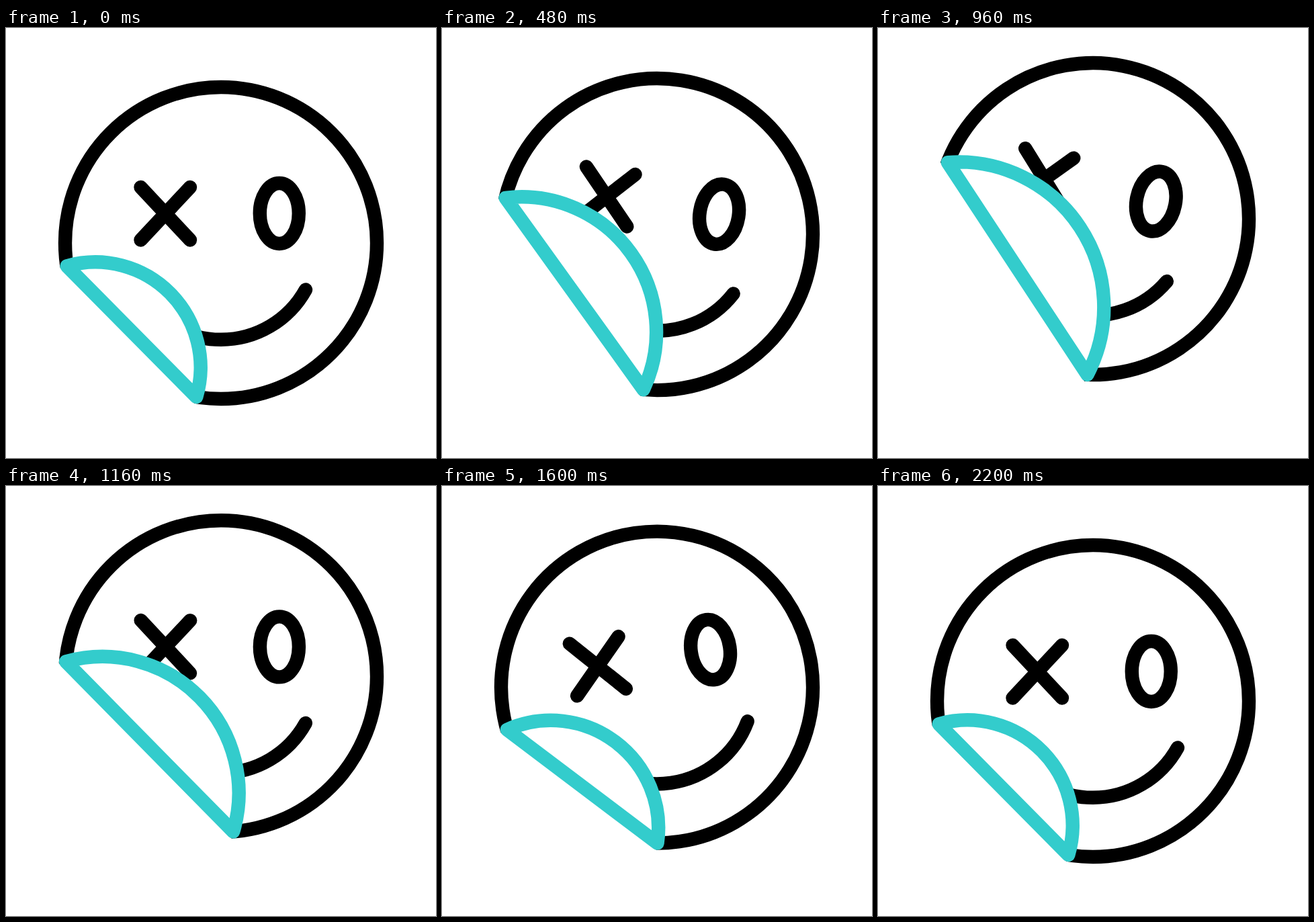
An HTML page for the animation above (2240 ms loop, 640x640 px).

```html
<!DOCTYPE html>
<html lang="en">
<head>
<meta charset="utf-8">
<title>Peeling sticker</title>
<style>
html, body { margin: 0; height: 100%; overflow: hidden; background: #fff; }
svg { display: block; width: 100%; height: 100%; }
</style>
</head>
<body>
<svg viewBox="0 0 640 640" fill="none" stroke="#000" stroke-width="20.4" stroke-linecap="round" stroke-linejoin="round">
  <clipPath id="kept"><rect id="keep" x="-300" y="-300" width="600" transform="rotate(45.3)"/></clipPath>
  <g id="sticker">
    <g clip-path="url(#kept)">
      <circle r="232"/>
      <path d="M-119.5-83 -46-4.5M-46-83 -119.5-4.5"/>
      <ellipse cx="86.8" cy="-44" rx="29" ry="45"/>
      <path d="M126 69.5A144 144 0 0 1-126 69.5"/>
    </g>
    <path id="flap" fill="#fff" stroke="#33cccc" transform="rotate(45.3)"/>
  </g>
</svg>
<script>
const LOOP = 2240, END = 2200, STEP = 40, RADIUS = 232;
const [sticker, keep, flap] = ['sticker', 'keep', 'flap'].map(id => document.getElementById(id));

const smooth = s => s * s * (3 - 2 * s);

// cubic-bezier(.5, 0, .55, 1), solved for the curve parameter by bisection
function glide(x) {
  let lo = 0, hi = 1;
  for (let i = 0; i < 24; i++) {
    const s = (lo + hi) / 2;
    if (1.5 * s - 1.35 * s * s + 0.85 * s ** 3 < x) lo = s; else hi = s;
  }
  return smooth(lo);
}

// keys: [time, value] pairs
function track(t, ease, keys) {
  const i = keys.findIndex(k => t < k[0]);
  if (i < 0) return keys[keys.length - 1][1];
  const [t0, a] = keys[i - 1], [t1, b] = keys[i];
  return a + (b - a) * ease((t - t0) / (t1 - t0));
}

function draw(t) {
  // the sinking mirrors the rise
  const y = track(Math.min(t, END - t), glide, [[0, 320], [END / 2, 283]]);
  const turn = track(t, glide, [[0, 0], [800, 13.75], [1430, -8.95], [END, 0]]);
  const fold = track(t, smooth, [[0, 187.2], [815, 130.5], [1710, 187.2]]);
  const half = Math.sqrt(RADIUS ** 2 - fold ** 2), bend = half * 1.143;
  sticker.setAttribute('transform', `translate(320 ${y}) rotate(${turn})`);
  keep.setAttribute('height', 309 + fold);
  flap.setAttribute('d', `M${-half} ${fold}A${bend} ${bend} 0 0 1 ${half} ${fold}Z`);
}

const start = performance.now();
function tick() {
  const t = (performance.now() - start) % LOOP;
  draw(Math.floor(t / STEP) * STEP);
  requestAnimationFrame(tick);
}
tick();
</script>
</body>
</html>
```
